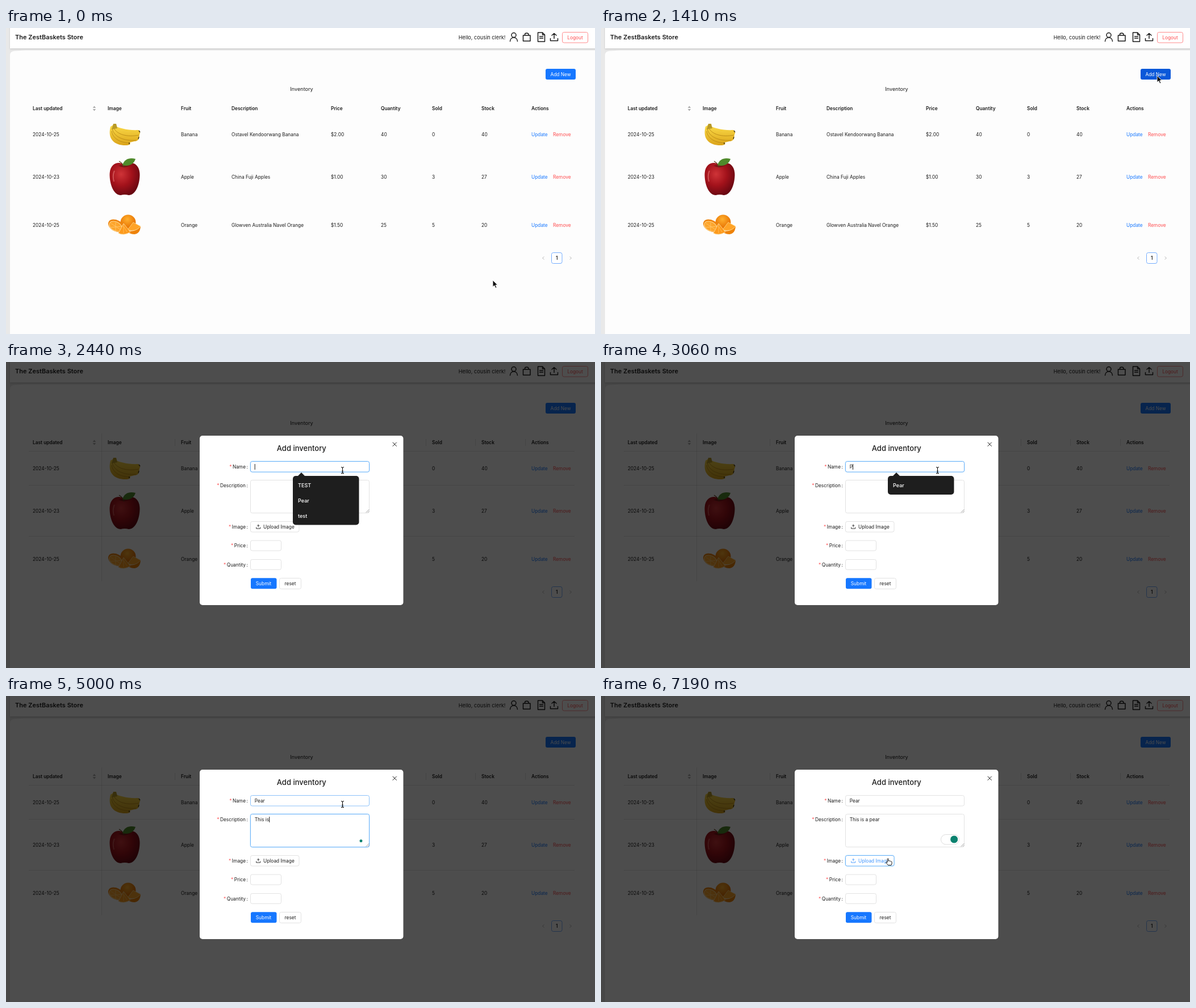
Write an HTML page that moves like this. It is 1037 by 540 pixels and loops after 8000 ms.

```html
<!DOCTYPE html>
<html lang="en">
<head>
<meta charset="utf-8">
<title>Inventory</title>
<style>
  html, body { margin: 0; width: 100%; height: 100%; overflow: hidden; background: #e7e7e7; }
  svg { display: block; width: 1037px; height: 540px; font: 8.35px Inter, "Open Sans", sans-serif; fill: #1c1c1c; }
  .line { fill: none; stroke: #1a1a1a; stroke-width: 1.5; stroke-linecap: round; stroke-linejoin: round; }
  .box { fill: #fff; stroke: #e2e2e2; }
  .ring { fill: none; stroke: #0591ff; stroke-opacity: .12; stroke-width: 3; }
</style>
</head>
<body>
<svg id="stage" viewBox="0 0 1037 540">
  <defs>
    <radialGradient id="red" cx=".38" cy=".35" r=".7">
      <stop offset="0" stop-color="#cf3438"/><stop offset=".5" stop-color="#a3121b"/><stop offset="1" stop-color="#650711"/>
    </radialGradient>
    <linearGradient id="yellow" x2="0" y2="1">
      <stop offset="0" stop-color="#fbdb48"/><stop offset="1" stop-color="#dba41a"/>
    </linearGradient>
    <radialGradient id="orange" cx=".45" cy=".3">
      <stop offset="0" stop-color="#ffb02e"/><stop offset="1" stop-color="#ea7a08"/>
    </radialGradient>
    <filter id="shadow" x="-10%" y="-50%" width="120%" height="200%">
      <feDropShadow dx="0" dy="1" stdDeviation="1.5" flood-opacity=".15"/>
    </filter>
  </defs>
</svg>
<script>
const BLUE = '#1677ff', RED = '#ff4d4f', GREEN = '#0b826f';
const stage = document.getElementById('stage');

// y is the vertical middle of the text
const text = (x, y, s, attrs = '') => `<text x="${x}" y="${y + 3}" ${attrs}>${s}</text>`;
const rect = (x, y, w, h, attrs = '') => `<rect x="${x}" y="${y}" width="${w}" height="${h}" ${attrs}/>`;
const path = (d, attrs = 'class="line"') => `<path d="${d}" ${attrs}/>`;
const MID = 'text-anchor="middle"';

const columns = [47, 179, 308, 397, 572, 660, 750, 837, 925];
const heads = ['Last updated', 'Image', 'Fruit', 'Description', 'Price', 'Quantity', 'Sold', 'Stock', 'Actions'];
const rows = [
  [188, '2024-10-25', '', 'Banana', 'Ostavel Kendoorwang Banana', '$2.00', 40, 0, 40],
  [262.5, '2024-10-23', '', 'Apple', 'China Fuji Apples', '$1.00', 30, 3, 27],
  [347.5, '2024-10-25', '', 'Orange', 'Glowven Australia Navel Orange', '$1.50', 25, 5, 20]
];

const banana =
  path('M189 171C198 177 216 181 233 180Q238 183 235 188L234 195Q232 200 226 200L218 202Q221 206 213 207C192 208 178 197 184 174Z', 'fill="url(#yellow)"') +
  path('M190 177C196 188 213 193 234 189M187 177C189 192 208 200 229 198M186 182C188 195 200 202 217 203', 'fill="none" stroke="#b98a17" stroke-width=".9"') +
  path('M189 169l5 0 2 8-10 2z', 'fill="#b99a27"') +
  path('M234 181l2 3M234 192l-1 4M217 202l0 3', 'stroke="#4a3a12" stroke-width="1.4"');
const apple =
  path('M209 243C216 234 236 236 235.500 260C235 279 227 295 216 295Q209 293 202 295C191 295 183 279 182.500 260C182 236 202 234 209 243Z', 'fill="url(#red)"') +
  path('M198 243Q209 249 220 242Q209 239 198 243', 'fill="#7a1414"') +
  path('M208 246Q206 239 199 235', 'fill="none" stroke="#5a3c1c" stroke-width="1.4"') +
  path('M205 242C208 231 218 228 228 231C225 241 215 245 205 242Z', 'fill="#4f8a2b"') +
  path('M191 252Q187 260 190 271', 'fill="none" stroke="#ef8a86" stroke-width="2" opacity=".5"');
const orange =
  '<circle cx="215" cy="343" r="13.5" fill="url(#orange)"/>' +
  '<ellipse cx="194" cy="349" rx="15" ry="10" transform="rotate(28 194 349)" fill="#ee8510"/>' +
  '<ellipse cx="193" cy="350" rx="12" ry="8" transform="rotate(28 193 350)" fill="#fda52c" stroke="#ffd68c"/>' +
  path('M185 345l17 11M193 343l0 15M184 352l19-2', 'stroke="#ffcf7a" stroke-width=".7"') +
  path('M213 357Q226 362 237 350Q236 363 226 364Q216 364 213 357Z', 'fill="#ee8208"') +
  path('M214 356L224 343L237 350Q228 361 214 356Z', 'fill="#ffa326" stroke="#ffd88e" stroke-width=".8"') +
  path('M198 362L207 345L219 360Q207 367 198 362Z', 'fill="#fd9a1c" stroke="#ffd38a"') +
  path('M207 346l0 16M207 350l6 10', 'stroke="#ffc970" stroke-width=".7"');

const icons =
  '<circle class="line" cx="894" cy="12.5" r="4"/>' + path('M887.5 23.5C888 14.500 900 14.500 900.5 23.5') +
  path('M910.500 13H923V23H910.500ZM913.500 13V11.500Q913.500 9 916.700 9T920 11.500V13') +
  path('M936.500 8H944.500L948.500 12V24H936.500ZM944.500 8V12H948.500M939.500 15H945.500M939.500 18H945.500') +
  path('M965 18.500V9.500M961 13L965 9.500L969 13M958.500 18.500V22.500H971.500V18.500');

const page =
  rect(0, 0, 7, 540, 'fill="#e9e9e9"') +
  rect(7, -4, 1034, 40, 'fill="#fff" filter="url(#shadow)"') +
  path('M7 540V48Q7 41 15 40.500L34 39.500H1037V540Z', 'fill="#fdfdfd"') +
  text(16, 17, 'The ZestBaskets Store', 'font-size="11" font-weight="600"') +
  text(879.500, 16.500, 'Hello, cousin clerk!', 'font-size="9.2" text-anchor="end"') + icons +
  rect(979.500, 7.500, 45, 18.500, 'rx="3" fill="#fff" stroke="#ff8a8b"') +
  text(1002, 16.500, 'Logout', `${MID} fill="${RED}"`) +
  rect(950, 72, 53, 19, 'id="add" rx="3"') + text(976.500, 81.500, 'Add New', `${MID} fill="#fff"`) +
  text(520.500, 108, 'Inventory', `${MID} font-size="9.1"`) +
  path('M40 157.500H1001M40 217.500H1001M40 307.500H1001M168.500 126V387' +
    columns.slice(2).map(x => `M${x - 10.500} 136V148`).join(''), 'id="grid" stroke="#000" stroke-opacity=".1"') +
  heads.map((h, i) => text(columns[i], 142, h, 'font-weight="600"')).join('') +
  path('M152.800 141L155.500 137.500L158.200 141ZM152.800 143L155.500 146.500L158.200 143Z', 'fill="#aaa"') +
  rows.map(([y, ...cells]) => cells.map((c, i) => text(columns[i], y, c)).join('') +
    text(925, y, 'Update', `fill="${BLUE}"`) + text(963, y, 'Remove', `fill="${RED}"`)).join('') +
  banana + apple + orange +
  rect(960.500, 396.500, 18.500, 19, 'rx="3" fill="#fff" stroke="#73acff"') +
  text(969.700, 406, '1', `${MID} font-weight="600"`) +
  path('M947.500 403.500L944.500 406L947.500 408.500M992.500 403.500L995.500 406L992.500 408.500', 'fill="none" stroke="#bbb"');

const label = (y, s) => text(426, y, `<tspan fill="${RED}">*</tspan> ${s} :`, 'text-anchor="end" word-spacing="-.8"');
const field = (id, y, w, h) => rect(430.500, y, w, h, `id="${id}Ring" class="ring" rx="3.500"`) +
  rect(430.500, y, w, h, `id="${id}" class="box" rx="3"`);

// The mask lies over the page twice, 45 % black each time
const modal = rect(0, 0, 1037, 540, 'fill-opacity=".45" fill="#000"').repeat(2) +
  rect(341, 130, 358.500, 299, 'rx="5" fill="#fff"') +
  text(520.300, 154, 'Add inventory', `${MID} font-size="13" font-weight="500"`) +
  path('M681 142L687.500 148.500M687.500 142L681 148.500', 'class="line" style="stroke-width:1"') +
  label(185, 'Name') + label(218, 'Description') + label(291, 'Image') + label(324, 'Price') + label(357.500, 'Quantity') +
  field('name', 175.500, 209, 18.500) + field('desc', 208.500, 209, 58) + field('upload', 281.500, 85.500, 18.500) +
  field('price', 315, 54, 18) + field('quantity', 348.500, 54, 18) +
  path('M634 265.500L639 260.500M637 265.500L639 263.500', 'class="line" style="stroke:#777;stroke-width:.7"') +
  '<g id="uploadLabel">' + path('M444.200 291.500V287.500M442.200 289.200L444.200 287.200L446.200 289.200M440.700 291.500V294H447.700V291.500',
    'fill="none" stroke="currentColor" stroke-width=".9"') + text(453, 290.800, 'Upload Image', 'fill="currentColor"') + '</g>' +
  rect(431, 381.300, 45.500, 19, `rx="3" fill="${BLUE}"`) + text(453.500, 391, 'Submit', `${MID} fill="#fff"`) +
  rect(481.500, 381.500, 38, 19, 'class="box" rx="3"') + text(500.500, 391, 'reset', MID) +
  text(437.700, 185, '', 'id="nameText"') + text(437.700, 218, '', 'id="descText" xml:space="preserve" style="white-space:pre"') +
  rect(0, 0, 1, 10, 'id="caret"') +
  rect(598.500, 244.500, 32, 17.500, 'id="pill" rx="8.700" fill="#fff" stroke="#ddd"') +
  `<circle id="badge" fill="${GREEN}" stroke="#fff"/>` +
  '<g id="menu" fill="#fff" font-size="9.1" font-weight="500">' +
  path('M513 202L520 195L527 202Z', 'fill="#1e1e1e"') + rect(505, 201, 116.500, 86.500, 'id="menuBox" rx="5" fill="#1e1e1e"') +
  [0, 1, 2].map(i => text(514, 217.500 + 27 * i, '', `id="item${i}"`)).join('') + '</g>';

const cursors =
  path('M0 0V12L2.800 9.400L5 14L7 13L4.900 8.700H8.600Z', 'id="arrow" fill="#111" stroke="#fff" stroke-width=".9"') +
  path('M-2.500 -5Q0 -5 0 -3Q0 -5 2.500 -5M0 -3V4M-2.500 6Q0 6 0 4Q0 6 2.500 6M-1.500 2H1.500', 'id="beam" fill="none" stroke="#111" stroke-width="1.100"') +
  path('M-2.300 1V-4.500Q-1.300 -6.500 -.300 -4.500V-.800Q1 -2 2 -.600Q3.200 -1.500 4 0Q5.600 -.400 5.600 1.500V3Q5.500 5 4.500 6.500H-1L-4.800 2Q-4.500 0 -2.300 1.500Z', 'id="hand" fill="#fff" stroke="#111"');

stage.insertAdjacentHTML('beforeend', page + `<g id="modal">${modal}</g>` + cursors);
const el = Object.fromEntries([...stage.querySelectorAll('[id]')].map(e => [e.id, e]));
const set = (id, attrs) => { for (const k in attrs) el[id].setAttribute(k, attrs[k]); };
const show = (id, on) => { el[id].style.display = on ? '' : 'none'; };

// Each entry holds from its time until the next one
const pointer = [
  [0, 857, 445], [150, 868, 420], [290, 892, 360], [440, 924, 275], [730, 940, 220],
  [910, 960, 150], [1080, 974, 105], [1250, 979, 84], [1820, 900, 106], [2030, 735, 150],
  [2240, 592.500, 190.500], [5650, 592.500, 190], [6240, 575, 222], [6400, 540, 258], [6560, 512, 286], [6710, 506.500, 292]
];
const nameTyped = [[0, ''], [3060, 'P'], [3510, 'Pear']];
const descTyped = [
  [0, ''], [4170, 'T'], [4470, 'Th'], [4640, 'This'], [4810, 'This i'], [4970, 'This is'], [5140, 'This is '],
  [5300, 'This is a'], [5470, 'This is a p'], [5650, 'This is a pe'], [5810, 'This is a pea'], [6090, 'This is a pear']
];
const at = (list, t) => list.findLast(entry => entry[0] <= t);

function style(id, focused, hovered) {
  set(id, { style: focused ? 'stroke:#6db3f8' : hovered ? 'stroke:#8cc2fa' : '' });
  show(id + 'Ring', focused);
}

function draw(t) {
  const between = (a, b) => t >= a && t < b;
  const [, x, y] = at(pointer, t);
  const kind = t >= 6560 ? 'hand' : t >= 2240 ? 'beam' : 'arrow';
  for (const c of ['arrow', 'beam', 'hand']) show(c, c === kind);
  set(kind, { transform: `translate(${x} ${y})` });

  set('add', { fill: between(1250, 1820) ? '#0958d9' : BLUE });
  show('modal', t >= 1640);
  show('grid', t >= 1640);

  style('name', between(2440, 4010), between(2240, 6240));
  style('desc', between(4010, 7190), false);
  style('upload', t >= 7190, t >= 6560);
  style('price');
  style('quantity');
  el.uploadLabel.style.color = t >= 6560 ? '#4096ff' : '#1c1c1c';

  el.nameText.textContent = at(nameTyped, t)[1];
  el.descText.textContent = at(descTyped, t)[1];
  const inDesc = t >= 4010, active = inDesc ? el.descText : el.nameText;
  show('caret', between(2440, 7190));
  set('caret', { x: 437.700 + active.getComputedTextLength(), y: inDesc ? 213 : 180 });

  const items = t < 3060 ? ['TEST', 'Pear', 'test'] : ['Pear', '', ''];
  items.forEach((s, i) => { el['item' + i].textContent = s; });
  show('menu', between(2440, 3510));
  set('menuBox', { height: t < 3060 ? 86.500 : 33 });

  const dot = between(4470, 6400);
  show('badge', inDesc);
  set('badge', { cx: dot ? 625 : 621.700, cy: dot ? 255.700 : 253, r: dot ? 3 : 7 });
  show('pill', t >= 7190);
}

function loop() {
  draw(performance.now() % 8000);
  requestAnimationFrame(loop);
}
loop();
</script>
</body>
</html>
```
